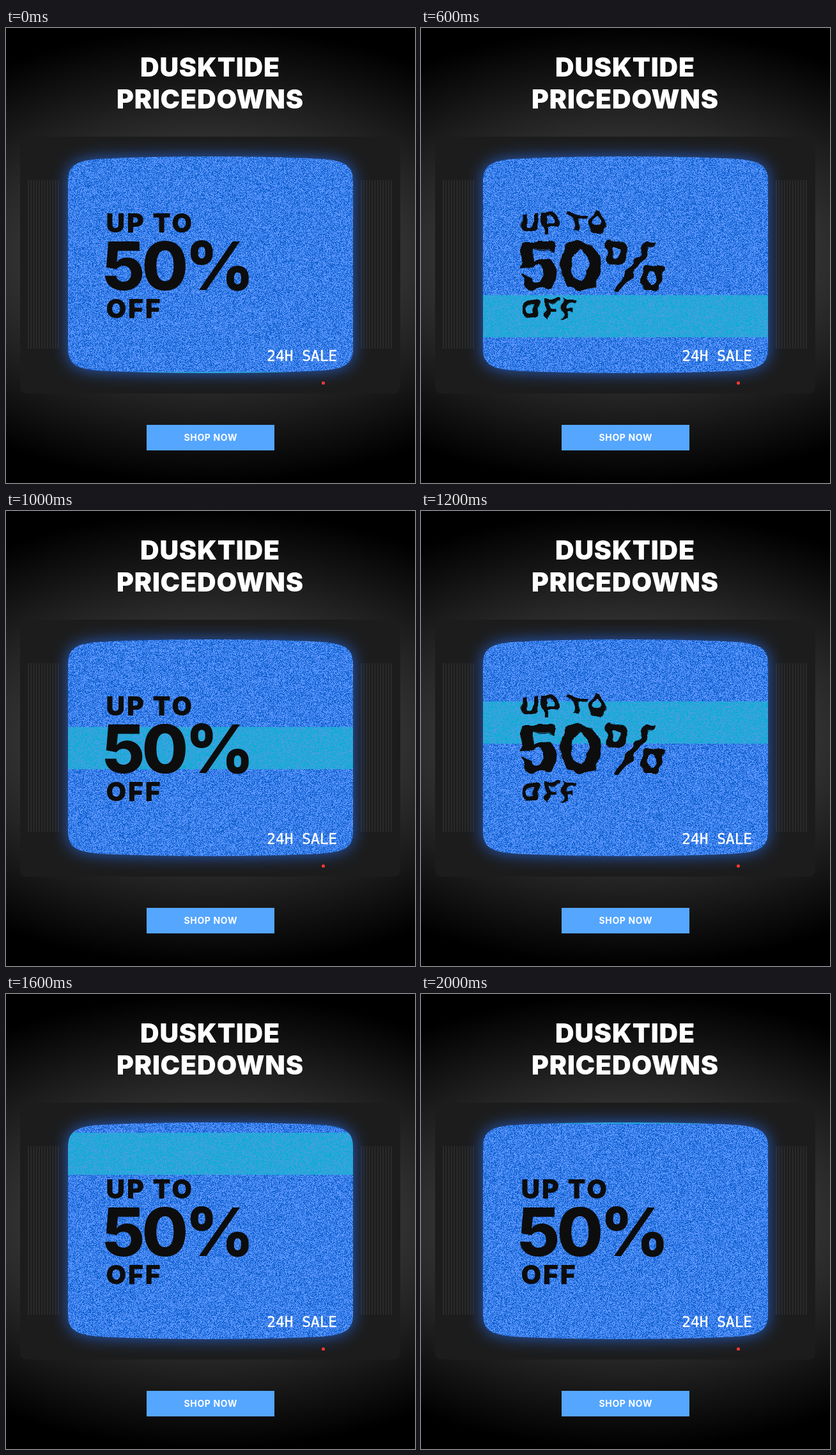
Animation of 640x712 px, one loop 2.2 s. Source, as an HTML page with a canvas:

```html
<!DOCTYPE html>
<html lang="en">
<head>
<meta charset="utf-8">
<title>Sale television</title>
<style>
  html, body { margin: 0; width: 100%; height: 100%; overflow: hidden; background: #000; }
  svg, canvas { position: absolute; left: 0; top: 0; display: block; }
  text { font-family: Inter, "Open Sans", sans-serif; fill: #fff; }
  .title { font-size: 41px; font-weight: 900; letter-spacing: .8px; text-anchor: middle; }
  .offer text { font-weight: 900; fill: #0d0d0d; }
  .offer .small { font-size: 41px; letter-spacing: 2.8px; }
  .offer .big { font-size: 105px; font-weight: 800; letter-spacing: -5px; }
  .tag { font: 22.8px "DejaVu Sans Mono", monospace; stroke: #fff; stroke-width: .4; }
  .cta { font-size: 14px; font-weight: 700; letter-spacing: .65px; text-anchor: middle; }
</style>
</head>
<body>
<svg width="640" height="712" viewBox="0 0 640 712">
  <defs>
    <radialGradient id="room" gradientUnits="userSpaceOnUse" cx="0" cy="0" r="1"
      gradientTransform="translate(320 356) scale(600 356)">
      <stop offset="0" stop-color="#606060"/>
      <stop offset="1" stop-color="#000"/>
    </radialGradient>
    <filter id="blur" filterUnits="userSpaceOnUse" x="30" y="130" width="580" height="480"
      color-interpolation-filters="sRGB">
      <feGaussianBlur stdDeviation="13"/>
    </filter>
  </defs>
  <rect width="640" height="712" fill="url(#room)"/>
  <rect x="22" y="170" width="595" height="402" rx="10" fill="#1c1c1c"/>
  <path id="grille" fill="none" stroke="#2b2b2b" stroke-width="2"/>
  <path id="glow" fill="#2a70f0" opacity=".8" filter="url(#blur)"/>
  <circle cx="496.5" cy="555.5" r="2.6" fill="#f0392f"/>
  <rect x="220" y="621" width="200" height="40" fill="#55a6ff"/>
  <text class="cta" x="320.3" y="646">SHOP NOW</text>
  <text class="title" x="319.4" y="75.5">DUSKTIDE</text>
  <text class="title" x="319.4" y="125.5">PRICEDOWNS</text>
</svg>
<canvas id="screen" width="640" height="712"></canvas>
<svg width="640" height="712" viewBox="0 0 640 712">
  <filter id="warp" filterUnits="userSpaceOnUse" x="130" y="270" width="280" height="210"
    color-interpolation-filters="sRGB">
    <feTurbulence type="fractalNoise" baseFrequency=".06" numOctaves="1" seed="4" result="n"/>
    <feDisplacementMap in="SourceGraphic" in2="n" scale="20" xChannelSelector="R" yChannelSelector="G"/>
  </filter>
  <g class="offer" id="offer">
    <text class="small" x="156.5" y="320">UP TO</text>
    <text class="big" x="151" y="409.5">50%</text>
    <text class="small" x="156.5" y="454">OFF</text>
  </g>
  <text class="tag" x="408.3" y="521">24H SALE</text>
</svg>
<script>
const LOOP = 2200, STEP = 200;
const X = 97, Y = 201, W = 446, H = 339;
const BAND = 66;
const $ = id => document.getElementById(id);

const outline = "M97 240C97 216 108 208 145 205C240 199.7 400 199.7 495 205" +
  "C532 208 543 216 543 240V501C543 525 532 533 495 536" +
  "C400 541.3 240 541.3 145 536C108 533 97 525 97 501Z";

const canvas = $("screen");
const ctx = canvas.getContext("2d");
const pixels = ctx.createImageData(W, H);
const cells = new Uint32Array(pixels.data.buffer);

// Packs 0xRRGGBB as opaque little-endian RGBA
const pack = c => (0xff000000 | (c & 255) << 16 | (c & 0xff00) | c >> 16) >>> 0;
const plain = [0x1161cf, 0x5a96ff].map(pack);
const tinted = [0x08aece, 0x459fe4].map(pack);

function random(seed) {
  let s = seed * 7919 + 12345 | 0;
  return () => {
    s ^= s << 13; s ^= s >>> 17; s ^= s << 5;
    return (s >>> 0) / 4294967296;
  };
}

function drawNoise(step) {
  const rnd = random(step + 1);
  const top = Math.round(538.3 - 40.1 * step) - Y;
  for (let y = 0, i = 0; y < H; y++) {
    const tones = y >= top && y < top + BAND ? tinted : plain;
    for (let x = 0; x < W; x++) cells[i++] = tones[rnd() < .54 ? 1 : 0];
  }
  ctx.putImageData(pixels, X, Y);
}

function setUp() {
  let d = "";
  for (const x0 of [35, 556])
    for (let i = 0; i < 12; i++) d += `M${x0 + i * 4.27} 238V502`;
  $("grille").setAttribute("d", d);
  $("glow").setAttribute("d", outline);
  canvas.style.clipPath = `path("${outline}")`;
}

let shown = -1;
function update(time) {
  const step = Math.floor(time % LOOP / STEP);
  if (step === shown) return;
  shown = step;
  drawNoise(step);
  const warped = step > 0 && step % 3 === 0;
  $("offer").setAttribute("filter", warped ? "url(#warp)" : "none");
}

function tick() {
  update(performance.now());
  requestAnimationFrame(tick);
}

setUp();
tick();
</script>
</body>
</html>
```
